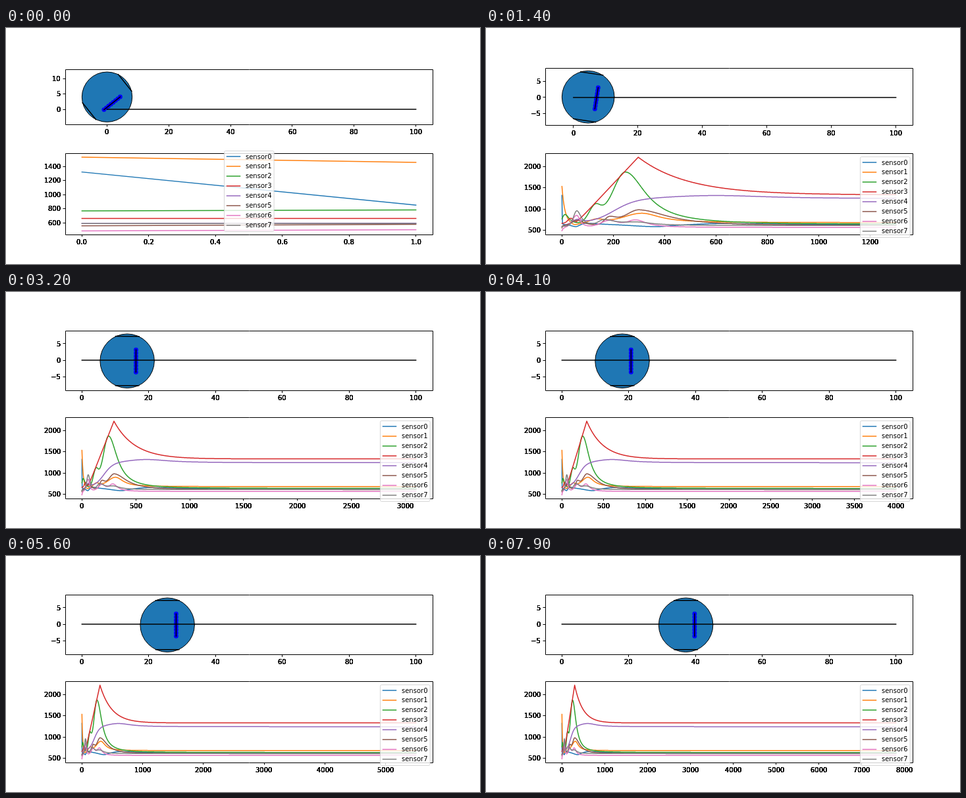
Recreate the animation shown at these times as an HTML page with a canvas. Size 720 px wide and 360 px high, loop 8000 ms.

```html
<!DOCTYPE html>
<html>
<head>
<meta charset="utf-8">
<style>
  html, body { margin: 0; width: 100%; height: 100%; overflow: hidden; background: #fff; }
  canvas { display: block; }
</style>
</head>
<body>
<canvas id="stage" width="720" height="360"></canvas>
<script>
const ctx = document.getElementById('stage').getContext('2d');
const LEFT = 90, WIDTH = 558, MARGIN = 0.05;
const PLOT_TOP = 191.45, PLOT_BOTTOM = 315, TRACK_MIDDLE = 105.2;
const LAST_STEP = 78, SAMPLES_PER_STEP = 100;

// Building blocks of the sensor signals.
const fade = (n, tau) => Math.exp(-n / tau);
const logistic = (n, at, width) => 1 / (1 + Math.exp((at - n) / width));
const bump = (n, at, height, rise, fall) => n < at
  ? height * Math.exp(-(((n - at) / rise) ** 2))
  : height / (1 + ((n - at) / fall) ** 2);
// Straight climb to a sharp peak, then exponential settling.
const climb = (n, low, from, peak, at, rest, tau) => n < at
  ? low + (peak - low) * Math.max(0, (n - from) / (at - from))
  : rest + (peak - rest) * fade(n - at, tau);

const SENSORS = [
  { color: '#1f77b4', signal: n => 635 + 685 * fade(n, 0.87) - bump(n, 55, 50, 25, 12)
      + bump(n, 90, 35, 15, 50) - bump(n, 370, 52, 130, 70) + bump(n, 610, 25, 110, 200) },
  { color: '#ff7f0e', signal: n => 680 + 850 * fade(n, 11) - bump(n, 50, 55, 20, 20)
      + bump(n, 135, 85, 35, 40) + bump(n, 312, 215, 95, 85) },
  { color: '#2ca02c', signal: n => 635 + bump(n, 12, 235, 16, 20)
      + bump(n, 130, 420, 36, 33) + bump(n, 248, 1200, 68, 97) },
  { color: '#d62728', signal: n => climb(n, 660, 55, 2215, 297, 1330, 192) + bump(n, 35, 120, 17, 14) },
  { color: '#9467bd', signal: n => 640 + 600 * logistic(n, 200, 45) - 57 * fade(n, 20)
      + bump(n, 60, 95, 25, 25) + bump(n, 600, 75, 250, 250) },
  { color: '#8c564b', signal: n => 608 - 52 * fade(n, 2) + bump(n, 60, 125, 30, 30)
      + bump(n, 185, 190, 28, 40) + bump(n, 302, 350, 70, 140) },
  { color: '#e377c2', signal: n => 565 - 80 * fade(n, 5) + bump(n, 58, 285, 25, 15)
      + bump(n, 187, 165, 50, 45) + bump(n, 289, 150, 45, 50) },
  { color: '#7f7f7f', signal: n => 610 - 20 * fade(n, 30) + bump(n, 58, 350, 18, 20)
      + bump(n, 165, 130, 30, 60) + bump(n, 294, 60, 60, 70) }
];
const readings = SENSORS.map(({ signal }) =>
  Array.from({ length: LAST_STEP * SAMPLES_PER_STEP + 1 }, (_, n) => signal(n)));

const ROBOT = { radius: 8.13, wheelOffset: 7.4, wheelHalf: 3.5, barAhead: 2.62, barHalf: 3.35 };

// Steers down towards the line, then swings smoothly onto it.
function headingAt(step) {
  const halfTan = step < 3
    ? 0.482 + 0.284 * step - 0.066 * step * step
    : 0.74 * Math.exp((3 - step) / 4.42);
  return -2 * Math.atan(halfTan);
}

function poseAt(step) {
  const dt = 0.05, speed = 0.501;
  let x = 0, y = 4.05;
  for (let i = 0; i < Math.round(step / dt); i++) {
    const a = headingAt((i + 0.5) * dt);
    x += speed * dt * Math.cos(a);
    y += speed * dt * Math.sin(a);
  }
  return { x, y, angle: headingAt(step) };
}

const snap = v => Math.floor(v) + 0.5;

function stroke(points, color = '#000', width = 1.5, cap = 'square') {
  ctx.beginPath();
  points.forEach(([x, y]) => ctx.lineTo(x, y));
  ctx.strokeStyle = color;
  ctx.lineWidth = width;
  ctx.lineCap = cap;
  ctx.lineJoin = 'round';
  ctx.stroke();
}

function ticks(lo, hi, maxBins) {
  const raw = (hi - lo) / maxBins;
  const power = 10 ** Math.floor(Math.log10(raw));
  const step = power * [1, 2, 2.5, 5, 10].find(m => m * power >= raw * 0.99999);
  const list = [];
  for (let i = Math.ceil(lo / step); i * step <= hi + step * 1e-6; i++) {
    const value = i * step;
    const label = step < 1 ? value.toFixed(1) : String(Math.abs(Math.round(value)));
    list.push({ value, label: (value < 0 ? '\u2212' : '') + label });
  }
  return list;
}

// Tick labels are overprinted, which makes them look heavier.
function tickLabel(text, x, y, align) {
  const left = Math.round(x - ctx.measureText(text).width * align);
  for (let i = 0; i < 6; i++) ctx.fillText(text, left, Math.round(y));
}

function drawAxes(top, bottom, xTicks, yTicks, toX, toY) {
  ctx.fillStyle = '#000';
  for (const { value, label } of xTicks) {
    const x = snap(toX(value));
    stroke([[x, bottom], [x, bottom + 3.5]], '#000', 1, 'butt');
    tickLabel(label, toX(value), bottom + 14.6, 0.5);
  }
  for (const { value, label } of yTicks) {
    const y = snap(toY(value));
    stroke([[LEFT, y], [LEFT - 3.5, y]], '#000', 1, 'butt');
    tickLabel(label, LEFT - 7, toY(value) + 3.7, 1);
  }
  const y0 = snap(top), y1 = snap(bottom);
  ctx.lineWidth = 1;
  ctx.strokeStyle = '#000';
  ctx.strokeRect(LEFT + 0.5, y0, WIDTH, y1 - y0);
}

function drawTrack(step) {
  const { x, y, angle } = poseAt(step);
  const { radius, wheelOffset, wheelHalf, barAhead, barHalf } = ROBOT;
  const dataLeft = Math.min(0, x - radius);
  const pad = (100 - dataLeft) * MARGIN;
  const lo = dataLeft - pad, hi = 100 + pad;
  const scale = WIDTH / (hi - lo);
  const halfHeight = radius * (1 + 2 * MARGIN);
  const toX = v => LEFT + (v - lo) * scale;
  const toY = v => TRACK_MIDDLE - (v - y) * scale;
  const cos = Math.cos(angle), sin = Math.sin(angle);
  const place = (ahead, side) =>
    [toX(x + ahead * cos - side * sin), toY(y + ahead * sin + side * cos)];

  ctx.beginPath();
  ctx.arc(toX(x), toY(y), radius * scale, 0, 2 * Math.PI);
  ctx.fillStyle = '#1f77b4';
  ctx.fill();
  ctx.lineWidth = 1;
  ctx.strokeStyle = '#000';
  ctx.stroke();

  ctx.fillStyle = '#00f';
  for (let i = 0; i < 8; i++) {
    ctx.beginPath();
    ctx.arc(...place(barAhead, barHalf * (i / 3.5 - 1)), 3.4, 0, 2 * Math.PI);
    ctx.fill();
  }
  const lineY = Math.round(toY(0));
  stroke([[toX(0), lineY], [toX(100), lineY]]);
  for (const side of [-wheelOffset, wheelOffset])
    stroke([place(-wheelHalf, side), place(wheelHalf, side)]);
  stroke([place(barAhead, -barHalf), place(barAhead, barHalf)]);

  drawAxes(TRACK_MIDDLE - halfHeight * scale, TRACK_MIDDLE + halfHeight * scale,
    ticks(lo, hi, 9), ticks(y - halfHeight, y + halfHeight, 4), toX, toY);
}

function drawLegend(x, y) {
  ctx.beginPath();
  ctx.roundRect(x, y, 75.6, 123, 2);
  ctx.fillStyle = 'rgba(255,255,255,0.8)';
  ctx.fill();
  ctx.strokeStyle = 'rgba(204,204,204,0.8)';
  ctx.lineWidth = 1;
  ctx.stroke();
  SENSORS.forEach(({ color }, i) => {
    const row = y + 8.5 + 14.93 * i;
    stroke([[x + 4, Math.round(row)], [x + 24, Math.round(row)]], color);
    ctx.fillStyle = '#000';
    ctx.fillText('sensor' + i, Math.round(x + 32), Math.round(row + 3.5));
  });
}

function drawPlot(step) {
  const count = step * SAMPLES_PER_STEP || 1;
  const visible = readings.map(r => r.slice(0, count + 1));
  let min = Infinity, max = -Infinity;
  for (const v of visible.flat()) {
    min = Math.min(min, v);
    max = Math.max(max, v);
  }
  const padX = count * MARGIN, padY = (max - min) * MARGIN;
  const lo = -padX, hi = count + padX, low = min - padY, high = max + padY;
  const toX = v => LEFT + (v - lo) / (hi - lo) * WIDTH;
  const toY = v => PLOT_BOTTOM - (v - low) / (high - low) * (PLOT_BOTTOM - PLOT_TOP);

  visible.forEach((values, i) =>
    stroke(values.map((v, n) => [toX(n), toY(v)]), SENSORS[i].color));
  drawAxes(PLOT_TOP, PLOT_BOTTOM, ticks(lo, hi, 9), ticks(low, high, 6), toX, toY);
  if (step === 0) drawLegend(331.5, 187.5);
  else drawLegend(568.5, 196.5);
}

function draw(step) {
  ctx.fillStyle = '#fff';
  ctx.fillRect(0, 0, 720, 360);
  ctx.font = '10px "DejaVu Sans", sans-serif';
  drawTrack(step);
  drawPlot(step);
}

let shown = -1;
function tick() {
  const step = Math.max(0, Math.floor(performance.now() % 8000 / 100) - 1);
  if (step !== shown) draw(shown = step);
  requestAnimationFrame(tick);
}
tick();
</script>
</body>
</html>
```
